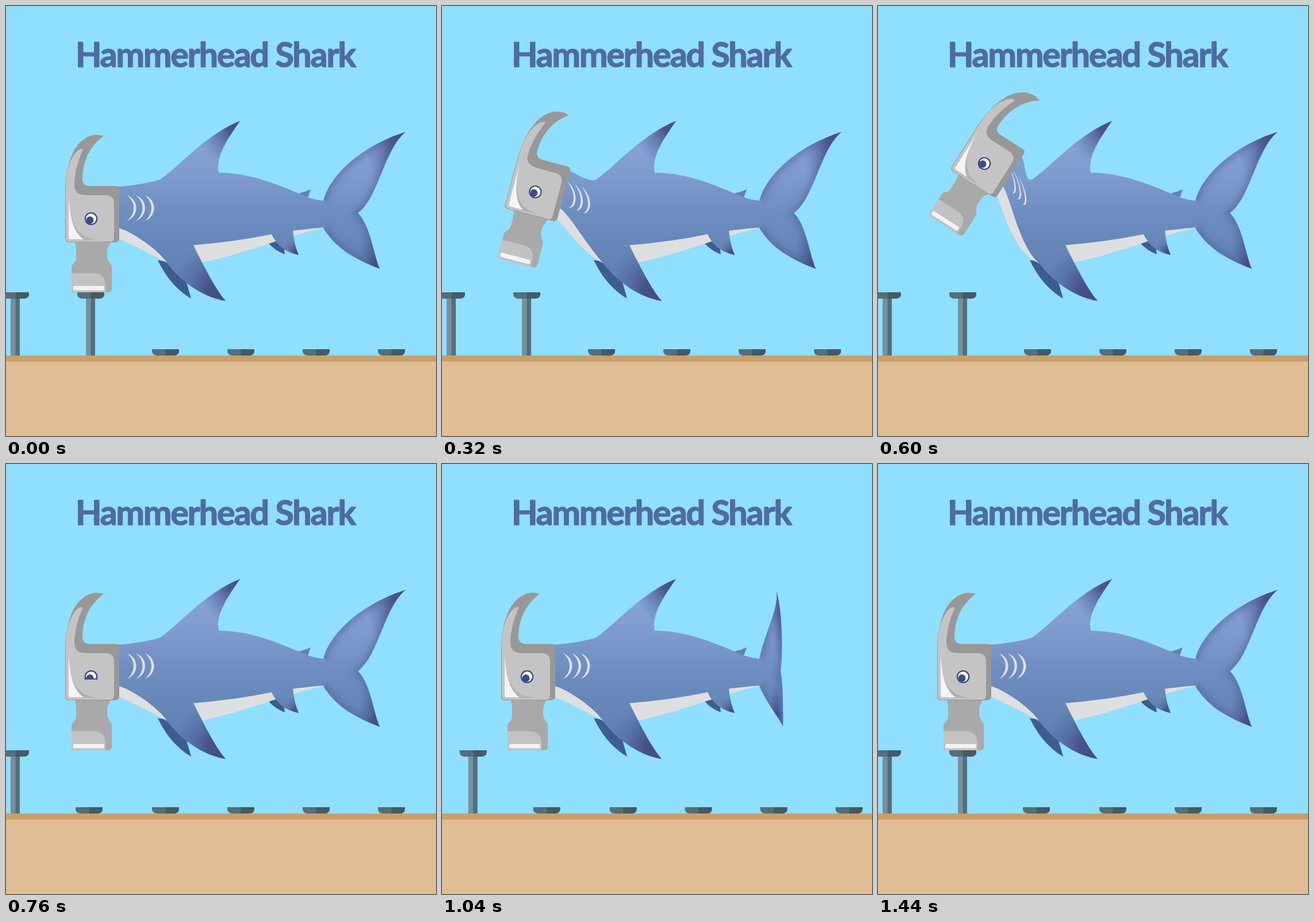
An HTML page for the animation above (1520 ms loop, 748 by 748 pixels).

```html
<!DOCTYPE html>
<html lang="en">
<head>
<meta charset="utf-8">
<title>Hammerhead Shark</title>
<style>
  html, body { margin: 0; width: 100%; height: 100%; overflow: hidden; background: #90dfff; }
  svg { display: block; width: 100vw; height: 100vh; }
  .title { font: 700 59px Lato, "Open Sans", sans-serif; letter-spacing: -2px; fill: #4f6ba3; stroke: #4f6ba3; stroke-width: 1.5; stroke-linejoin: round; text-anchor: middle; }
</style>
</head>
<body>
<svg viewBox="0 0 748 748">
  <defs>
    <linearGradient id="skin" gradientUnits="userSpaceOnUse" x1="0" y1="220" x2="0" y2="460">
      <stop offset="0" stop-color="#8aa7d8"/>
      <stop offset=".33" stop-color="#7e9acc"/>
      <stop offset=".6" stop-color="#6d8cbf"/>
      <stop offset="1" stop-color="#6182b3"/>
    </linearGradient>
    <linearGradient id="dark">
      <stop offset="0" stop-color="#434c84"/>
      <stop offset=".3" stop-color="#434c84" stop-opacity=".9"/>
      <stop offset="1" stop-color="#536aa6" stop-opacity="0"/>
    </linearGradient>
    <radialGradient id="dorsal" href="#dark" gradientUnits="userSpaceOnUse" cx="409" cy="205" r="80"/>
    <radialGradient id="pectoral" href="#dark" gradientUnits="userSpaceOnUse" cx="378" cy="500" r="92"/>
    <radialGradient id="pelvic" href="#dark" gradientUnits="userSpaceOnUse" cx="509" cy="433" r="30"/>
    <radialGradient id="tipTop" href="#dark" cx="1" cy=".04" r=".5"/>
    <radialGradient id="tipLow" href="#dark" cx=".72" cy="1" r=".34"/>
    <filter id="soft" x="-30%" y="-30%" width="160%" height="160%"><feGaussianBlur stdDeviation="6"/></filter>
    <clipPath id="inTail"><path data-tail/></clipPath>
    <g id="cap">
      <path d="M0 0H47V4Q46 11 38 11H9Q1 11 0 4Z" fill="#546e7a"/>
      <path d="M23.500 0H47V4Q46 11 38 11H23.500Z" fill="#455a64"/>
    </g>
    <g id="tall">
      <path d="M15 10H31V110H15Z" fill="#78909c"/>
      <path d="M23.500 10H31V110H23.500Z" fill="#546e7a"/>
      <use href="#cap"/>
    </g>
    <path id="gill" d="M210 329C232 337 232 366 210 374C226 362 226 341 210 329Z"/>
  </defs>

  <rect width="748" height="748" fill="#90dfff"/>
  <text class="title" x="364" y="106">Hammerhead Shark</text>

  <g id="nails"></g>
  <rect y="608" width="748" height="140" fill="#e1bd95"/>
  <rect y="608" width="748" height="10.500" fill="#c99f6c"/>

  <g fill="#3d5d92">
    <path d="M264 442C276 468 296 494 322 509L315 484L300 448Z"/>
    <path d="M455 411Q468 426 485 432L484 424L478 406Z"/>
  </g>
  <path id="belly" fill="#dedfe0"/>
  <path data-tail fill="url(#skin)"/>
  <g clip-path="url(#inTail)">
    <path data-tail fill="none" stroke="#4d609c" stroke-width="13" opacity=".55" filter="url(#soft)"/>
  </g>
  <path data-tail fill="url(#tipTop)"/>
  <path data-tail fill="url(#tipLow)"/>
  <path id="body" fill="url(#skin)"/>
  <path d="M300 279C335 248 360 219 407 200C385 232 364 262 370 290Z" fill="url(#dorsal)"/>
  <path d="M280 447L326 416C338 440 362 490 382 513C338 506 300 474 280 447Z" fill="url(#pectoral)"/>
  <path d="M462 397L499 391Q502 418 509 433C485 428 470 415 462 397Z" fill="url(#pelvic)"/>
  <path d="M509 326Q520 324 530 319L525 333Z" fill="#5b72ad" opacity=".6"/>
  <g id="gills" fill="#dfe1e3">
    <use href="#gill"/>
    <use href="#gill" x="15.500"/>
    <use href="#gill" x="31"/>
  </g>

  <g id="head">
    <path d="M121 409H184Q175 420 176 430Q175 442 182 449Q184 451 184 456V492Q184 498 178 498H118Q113 498 114 492V456Q114 451 118 448Q122 445 122 438V424Q122 416 119 409Z" fill="#a9a9a9"/>
    <path d="M114 465H156Q173 467 173 486V498H118Q113 498 114 492Z" fill="#c2c2c2"/>
    <rect x="117" y="487" width="54" height="7.500" rx="3" fill="#f3f3f3"/>
    <path d="M170 226C150 219 130 230 118 252C106 275 103 300 103 330V405Q103 411 109 411H190Q197 411 197 404V319Q197 313 191 313H146Q132 313 133 298C134 270 145 244 170 226Z" fill="#989898"/>
    <path d="M134 249C124 247 115 262 110 275C104 292 104 310 104 330V404Q104 410 110 410H181Q188 410 188 403V343Q188 329 172 329H140Q119 329 119 312C119 290 125 270 134 249Z" fill="#c4c4c4"/>
    <path d="M109 330C112 380 122 404 165 407H112Q109 406 109 402Z" fill="#b2b2b2"/>
    <path d="M109 330C111 362 115 392 135 406H112Q109 406 109 402Z" fill="#f4f4f4"/>
    <circle cx="148" cy="370" r="11.300" fill="#3c4d86"/>
    <circle cx="148" cy="370" r="9" fill="#fff"/>
    <circle cx="146" cy="372.500" r="6.500" fill="#3c4d86"/>
    <g id="lid">
      <path d="M135 374H161V383H135Z" fill="#c4c4c4"/>
      <path d="M137.500 374H158.500" stroke="#3c4d86" stroke-width="2.200" stroke-linecap="round"/>
    </g>
  </g>
</svg>
<script>
const LOOP = 1520, STEP = 40, HIT = 720, GAP = 131;
const TAIL = `M552,339 C562,298 612,246 695,219 C657,250 648,335 612,360
  C634,382 638,428 650,457 C605,440 572,420 552,386`;

const $ = id => document.getElementById(id);
const show = (id, on) => { $(id).style.display = on ? '' : 'none'; };
const tails = document.querySelectorAll('[data-tail]');

const part = (t, from, to) => Math.min(1, Math.max(0, (t - from) / (to - from)));
const ease = (t, from, to) => (1 - Math.cos(Math.PI * part(t, from, to))) / 2;

const nail = (kind, x, y, id = '') => `<use href="#${kind}" x="${x}" y="${y}" id="${id}"/>`;
let row = nail('tall', 124, 498, 'up') + nail('cap', 121, 597, 'down');
for (let i = 0; i < 4; i++) {
  if (i < 2) row += nail('tall', 124 - GAP * (i + 1), 498);
  row += nail('cap', 254 + GAP * i, 597);
}
$('nails').innerHTML = row;

// Narrows the tail as it swings towards the viewer, bowing its middle outwards
function bendTail(swing) {
  return TAIL.replace(/(\d+),/g, (_, x) => {
    const d = x - 552;
    const bow = 32 * swing * Math.sin(Math.PI * d / 143);
    return (552 + d * (1 - swing) + bow).toFixed(2) + ',';
  });
}

function draw(t) {
  // Slow lift, then a fast drop onto the nail
  const up = 1 - part(t, 600, HIT) ** 2;
  const turn = 32.5 * up * ease(t, 50, 620);
  const x = 148 + 37 * up * ease(t, 140, 560);
  const y = 370 - 98 * up * ease(t, 0, 660);
  const r = turn * Math.PI / 180, c = Math.cos(r), s = Math.sin(r);
  const bend = turn / 27.5;
  // Maps a point of the resting head to its current place
  const at = (px, py) => {
    const dx = px - 148, dy = py - 370;
    return (x + dx * c - dy * s).toFixed(2) + ',' + (y + dx * s + dy * c).toFixed(2);
  };

  $('head').setAttribute('transform', `translate(${x} ${y}) rotate(${turn}) translate(-148 -370)`);
  show('lid', t >= HIT && t < HIT + 120);

  $('body').setAttribute('d', `M${at(188, 314 + 10 * bend)} L${at(196, 314 + 10 * bend)}
    C${at(206, 315 + 10 * bend)} 254,307 268,302
    C305,276 345,225 407,200 C385,232 364,262 370,290 C425,290 470,310 509,326
    Q520,324 530,319 L525,333 Q540,338 556,339 V385 Q530,387 499,391 Q502,418 509,433
    C485,428 470,415 462,397 Q400,410 326,416 C338,440 362,490 382,513
    C338,506 300,474 280,447 C${262 - 14 * bend},420 ${at(212, 389)} ${at(195, 386)} L${at(188, 386)}Z`);
  $('belly').setAttribute('d', `M${at(193, 404)} C${at(207, 409)} ${250 - 15 * bend},430 282,448
    L342,446 C420,430 470,405 553,386 V380 L326,405 L285,400 L${at(193, 380)}Z`);

  const squash = [1 - .35 * bend, .55 * bend, .15 * bend, 1 + .1 * bend];
  $('gills').setAttribute('transform',
    `translate(258 ${352 - 17 * bend}) matrix(${squash} 0 0) translate(-258 -352)`);

  const tail = bendTail(.8 * Math.sin(Math.PI * part(t, 760, 1340)) ** 2);
  tails.forEach(el => el.setAttribute('d', tail));

  $('nails').setAttribute('transform', `translate(${GAP * ease(t, 850, 1378)} 0)`);
  show('up', t < HIT);
  show('down', t >= HIT);
}

const start = performance.now();
function tick() {
  const t = (performance.now() - start) % LOOP;
  draw(Math.floor(t / STEP) * STEP);
  requestAnimationFrame(tick);
}
tick();
</script>
</body>
</html>
```
